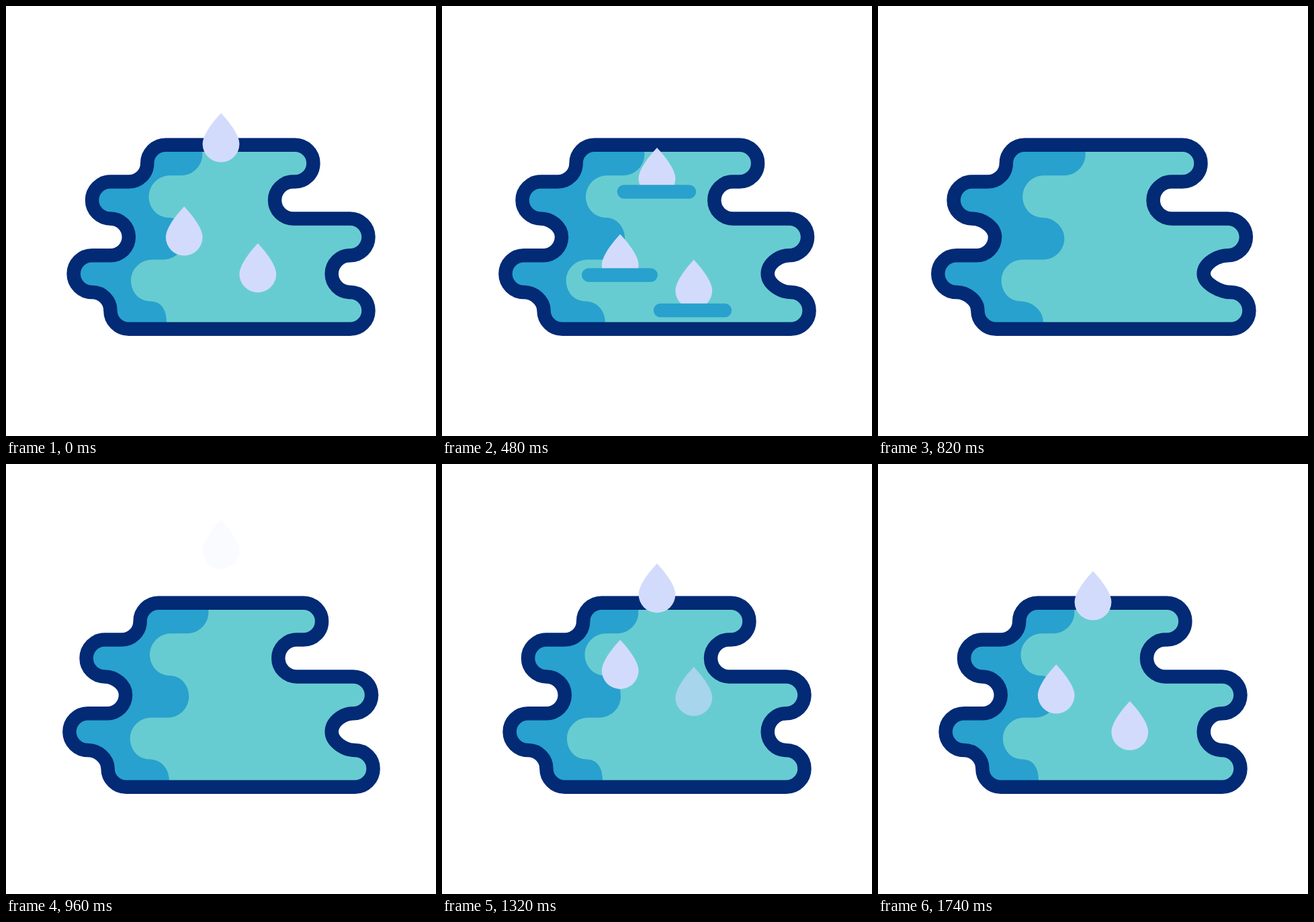
These frames come from a looping animation (640x640 px, 1.94 s). An HTML page:

```html
<!DOCTYPE html>
<html lang="en">
<head>
<meta charset="utf-8">
<title>Puddle</title>
<style>
  html, body { margin: 0; width: 100%; height: 100%; overflow: hidden; background: #fff; }
  svg { display: block; width: 100vw; height: 100vh; }
  .drop { fill: #d2dbfc; }
  .ripple { stroke: #28a1ce; stroke-width: 20.5; stroke-linecap: round; }
</style>
</head>
<body>
<svg viewBox="0 0 640 640">
  <defs><clipPath id="inside"><path id="clip"/></clipPath></defs>
  <path id="water" fill="#67ccd1"/>
  <path id="shade" fill="#28a1ce" clip-path="url(#inside)"/>
  <path id="rim" fill="none" stroke="#022a75" stroke-width="20.5"/>
  <g id="drops"></g>
</svg>
<script>
const LOOP = 1940, STEP = 20, LAST = 1740;
const NS = 'http://www.w3.org/2000/svg';
const $ = id => document.getElementById(id);
const clamp = v => Math.min(1, Math.max(0, v));
const smooth = u => u * u * (3 - 2 * u);
const ramp = (t, from, to) => smooth(clamp((t - from) / (to - from)));

function add(parent, tag, attrs) {
  const el = document.createElementNS(NS, tag);
  for (const key in attrs) el.setAttribute(key, attrs[key]);
  return parent.appendChild(el);
}

// Builds a path from straight runs and rounded quarter turns.
function pen(x, y, handle) {
  let d = `M${x} ${y}`;
  const curve = (ax, ay, bx, by, nx, ny) => {
    d += `C${ax} ${ay} ${bx} ${by} ${nx} ${ny}`;
    x = nx; y = ny;
    return api;
  };
  const api = {
    line(nx, ny = y) { d += `L${nx} ${ny}`; x = nx; y = ny; return api; },
    // leaves sideways, arrives upright
    side(nx, ny) {
      return curve(x + Math.sign(nx - x) * handle, y, nx, ny - Math.sign(ny - y) * handle, nx, ny);
    },
    // leaves upright, arrives sideways
    up(nx, ny) {
      return curve(x, y + Math.sign(ny - y) * handle, nx - Math.sign(nx - x) * handle, ny, nx, ny);
    },
    end: () => d + 'Z'
  };
  return api;
}

const R = 27.4, row = n => 206.8 + n * R;

function outline(m) {
  const top = 430 + 27 * m, notch = 427.4 + 11.2 * m;
  const mid = 512.1 + 9.8 * m, low = 512.1 + 15.1 * m;
  const base = 182.8 - 8.2 * m, west = 128 - 13.2 * m;
  const bay = 155.4 - 10.2 * m, arm = 155.4 - 18 * m, head = 237.6 - 22.6 * m;
  return pen(head, row(0), 15.13)
    .line(top).side(top + R, row(1)).up(top, row(2))
    .line(notch).side(notch - R, row(3)).up(notch, row(4))
    .line(mid).side(mid + R, row(5)).up(mid, row(6))
    .side(484.7, row(7)).up(low, row(8))
    .side(low + R, row(9)).up(low, row(10))
    .line(base).side(base - R, row(9)).up(west, row(8))
    .side(west - R, row(7)).up(west, row(6))
    .line(bay).side(bay + R, row(5)).up(arm, row(4))
    .side(arm - R, row(3)).up(arm, row(2))
    .line(head - 2 * R).side(head - R, row(1)).up(head, row(0))
    .end();
}

function shadow(m) {
  const top = 292.3 + 19.2 * m, cove = 212.5 + 3.2 * m, bulge = 266 + 13.3 * m;
  const nook = 186 - 2.7 * m, foot = 239 + 8.2 * m;
  const r = 31.3, neck = cove + 29.5;
  return pen(60, 190, 17)
    .line(top).line(top, 221)
    .up(top - r, 252.2).line(cove + r).side(cove, 283.6).up(neck, 314.9)
    .side(bulge, 346.2).up(bulge - r, 377.4)
    .line(nook + r).side(nook, 408.5).up(nook + 29, 439.5)
    .side(foot, 470.6).line(foot, 490).line(60)
    .end();
}

// fall: squared and fifth-power terms; rise: start, end, height; ripple: open, widest, shut
const drops = [
  { x: 320, y: 159.5, mid: 319.4, line: 276.4, fall: [89.6, 1210], rise: [900, 1450, 79], fade: [892, 1195], ripple: [193, 453, 713, 100] },
  { x: 265.2, y: 298.4, mid: 264.5, line: 400.5, fall: [74, 958], rise: [1005, 1625, 75], fade: [1005, 1310], ripple: [155, 417, 770, 101] },
  { x: 374.8, y: 353.3, mid: 373, line: 453, fall: [64, 381], rise: [1100, 1765, 69], fade: [1120, 1470], ripple: [240, 520, 800, 101.5] }
];

drops.forEach((p, i) => {
  const clip = add(document.querySelector('defs'), 'clipPath', { id: 'above' + i });
  add(clip, 'rect', { x: 0, y: 0, width: 640, height: p.line });
  const g = add($('drops'), 'g', { 'clip-path': `url(#above${i})` });
  p.body = add(g, 'path', {
    class: 'drop',
    d: 'M0 0C0 0 27.4 28 27.4 45.7A27.4 27.4 0 0 1 -27.4 45.7C-27.4 28 0 0 0 0Z'
  });
  p.wave = add($('drops'), 'line', { class: 'ripple', y1: p.line, y2: p.line });
});

function moveDrop(p, t) {
  const s = t / 1000;
  const falling = t < 840;
  const dy = falling
    ? Math.min(140, p.fall[0] * s ** 2 + p.fall[1] * s ** 5)
    : -p.rise[2] * (1 - ramp(t, p.rise[0], p.rise[1]));
  p.body.setAttribute('transform', `translate(${p.x} ${p.y + dy})`);
  p.body.setAttribute('opacity', falling ? 1 : ramp(t, ...p.fade));

  const [open, wide, shut, size] = p.ripple;
  const half = size / 2 * ramp(t, open, wide) * (1 - ramp(t, wide, shut));
  p.wave.setAttribute('x1', p.mid - half);
  p.wave.setAttribute('x2', p.mid + half);
  p.wave.setAttribute('visibility', half > 0.05 ? 'visible' : 'hidden');
}

function swell(t) {
  const u = clamp((420 - Math.max(0, Math.abs(t - 720) - 20)) / 420);
  return (u + smooth(u)) / 2;
}

const start = performance.now();

function draw(now) {
  const time = Math.max(0, now - start) % LOOP;
  const t = Math.min(LAST, Math.floor(time / STEP) * STEP);
  const m = swell(t), edge = outline(m);
  for (const id of ['clip', 'water', 'rim']) $(id).setAttribute('d', edge);
  $('shade').setAttribute('d', shadow(m));
  drops.forEach(p => moveDrop(p, t));
  requestAnimationFrame(draw);
}
draw(start);
</script>
</body>
</html>
```
